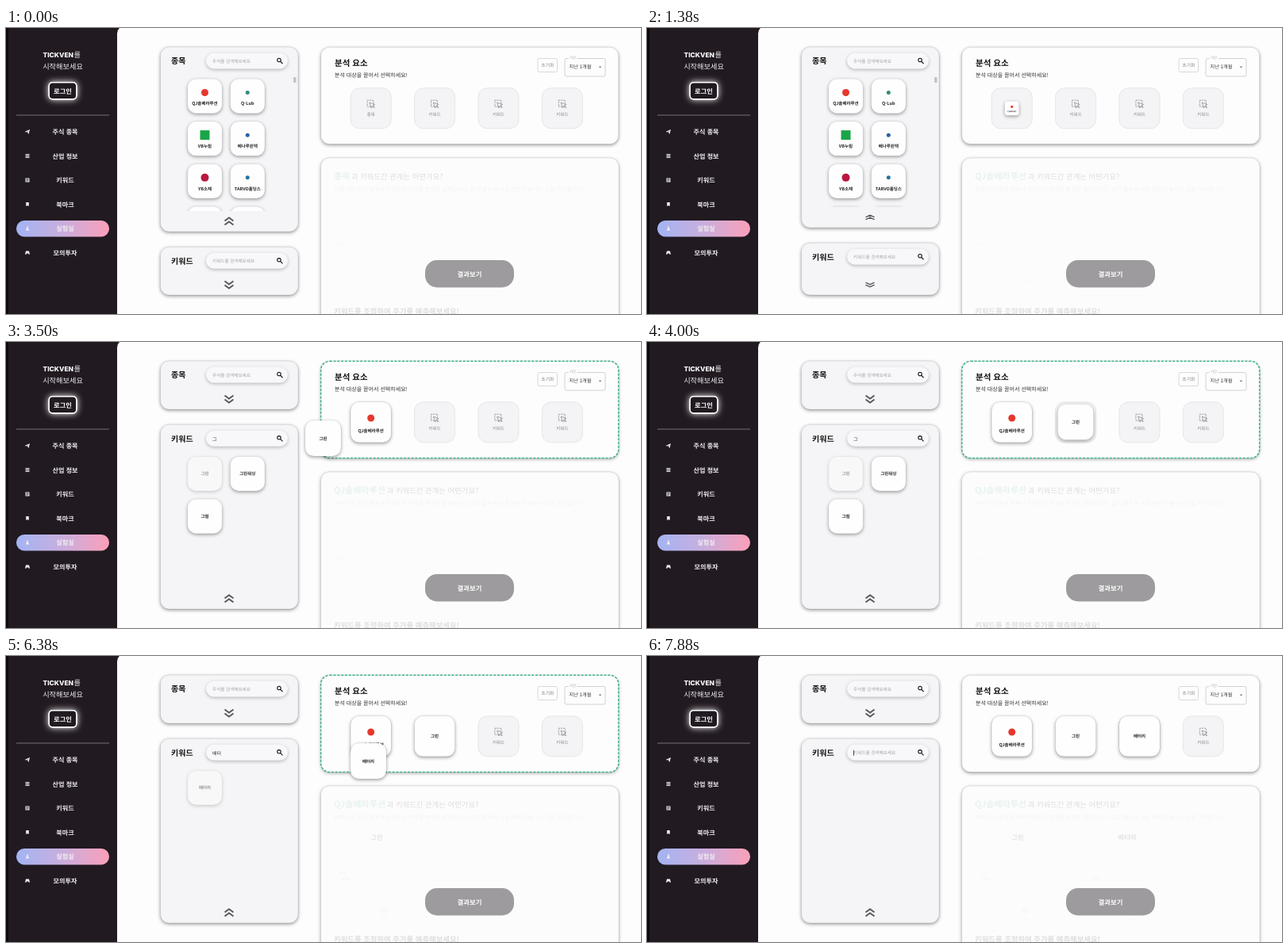
Recreate the animation shown at these times as an HTML page with a canvas. Size 800 px wide and 361 px high, loop 8 s.

```html
<!DOCTYPE html>
<html lang="ko">
<head>
<meta charset="utf-8">
<style>
html, body { margin: 0; width: 100%; height: 100%; overflow: hidden; background: #fefdfe; }
canvas { display: block; width: 800px; height: 361px; }
</style>
</head>
<body>
<canvas id="stage"></canvas>
<script>
const LOOP = 8000, STEP = 125;
const FONT = '"Noto Sans CJK KR", "Noto Sans CJK JP", "Noto Sans CJK", "Noto Sans", sans-serif';
const canvas = document.getElementById('stage');
const dpr = window.devicePixelRatio || 1;
canvas.width = 800 * dpr;
canvas.height = 361 * dpr;
const ctx = canvas.getContext('2d');
ctx.scale(dpr, dpr);
ctx.textBaseline = 'middle';
ctx.textRendering = 'geometricPrecision';

const STOCKS = [
  { label: 'QJ솔베라루션', color: '#e5382c', r: 4.5 },
  { label: 'Q-Lub', color: '#2f8d78', r: 2.5 },
  { label: 'VB누림', color: '#1aa548', r: 6, square: true },
  { label: '베나루윈텍', color: '#2c62a6', r: 2.5 },
  { label: 'YB소재', color: '#b8183f', r: 5 },
  { label: 'TARVO홀딩스', color: '#2273a3', r: 2.5 },
  { label: '' }, { label: '' }
];
const MATCHES = {
  '그': ['그린', '그린워싱', '그림'],
  '배': ['배당', '배수', '배터리', '배틀'],
  '배터': ['배터리']
};
// time, text, focused
const TYPING = [
  [0, '', false], [2000, '', true], [2125, 'ㄱ', true], [2250, '그', true], [2800, '그', false],
  [4375, '그', true], [4500, '', true], [4750, 'ㅂ', true], [4875, '배', true],
  [5250, '뱉', true], [5375, '배터', true], [5700, '배터', false],
  [7375, '배터', true], [7500, '', true]
];
// path points: time, x, y
const DRAGS = [
  { item: STOCKS[0], drop: 1305, path: [[375, 250.5, 86], [800, 400, 96], [1200, 459.5, 101]] },
  { item: { label: '그린' }, drop: 4010, path: [[2875, 250.5, 166], [3500, 399.5, 121.5], [3950, 540, 101]] },
  { item: { label: '배터리' }, drop: 6880, path: [[5750, 250.5, 166], [6375, 456.5, 132.5], [6830, 620.5, 101]] }
];
const FOLD_AT = 1305, FOLD_MS = 360;

const clamp = v => Math.max(0, Math.min(1, v));
const easeCubic = p => p < 0.5 ? 4 * p ** 3 : 1 - 4 * (1 - p) ** 3;

function text(str, x, y, size, color = '#222', weight = 400, align = 'left') {
  ctx.font = `${weight} ${size}px ${FONT}`;
  ctx.fillStyle = color;
  ctx.textAlign = align;
  ctx.fillText(str, x, y);
}

function box(x, y, w, h, r, fill, { stroke, shadow = 0, width = 1, dash = [] } = {}) {
  ctx.save();
  ctx.beginPath();
  ctx.roundRect(x, y, w, h, r);
  if (shadow) {
    ctx.shadowColor = `rgba(0,0,0,${shadow})`;
    ctx.shadowBlur = 4 * dpr;
    ctx.shadowOffsetY = 1.5 * dpr;
  }
  if (fill) { ctx.fillStyle = fill; ctx.fill(); }
  ctx.shadowColor = 'transparent';
  if (stroke) {
    ctx.strokeStyle = stroke;
    ctx.lineWidth = width;
    ctx.setLineDash(dash);
    ctx.stroke();
  }
  ctx.restore();
}

function drawPath(x, y, d, { fill, stroke, width = 1, dash = [], flip = 1 }) {
  const path = new Path2D(d);
  ctx.save();
  ctx.translate(x, y);
  ctx.scale(1, flip);
  if (fill) { ctx.fillStyle = fill; ctx.fill(path, 'evenodd'); }
  if (stroke) {
    ctx.strokeStyle = stroke;
    ctx.lineWidth = width;
    ctx.setLineDash(dash);
    ctx.stroke(path);
  }
  ctx.restore();
}

function card(cx, cy, size, item, { scale = 1, faded = false } = {}) {
  ctx.save();
  ctx.translate(cx, cy);
  ctx.scale(scale, scale);
  box(-size / 2, -size / 2, size, size, 10.5, faded ? '#f9f8f9' : '#fffeff',
    { stroke: 'rgba(0,0,0,.05)', shadow: faded ? 0.16 : 0.38, width: 0.7 });
  if (faded) ctx.globalAlpha = 0.45;
  if (item.color) {
    const r = item.r;
    box(-r, -size * 0.105 - r, 2 * r, 2 * r, item.square ? 0 : r, item.color);
  }
  text(item.label, 0, item.color ? size * 0.215 : 0, 5.5, '#222', 700, 'center');
  ctx.restore();
}

// flip: 1 points up, -1 points down
function chevrons(x, y, flip) {
  drawPath(x, y, 'M-5.5 -.5L0 -4.5L5.5 -.5M-5.5 4.5L0 .5L5.5 4.5', { stroke: '#5a595b', width: 2, flip });
}

function panel(top, bottom, title, placeholder, typed, caret) {
  box(194.5, top, 173.5, bottom - top, 11, '#f5f4f6', { stroke: 'rgba(0,0,0,.11)', shadow: 0.4, width: 0.8 });
  text(title, 208, top + 17.5, 10, '#111', 700);
  box(252, top + 7.5, 103, 20, 10, '#f8f7f9', { shadow: 0.25 });
  if (typed) text(typed, 260, top + 18, 6, '#333');
  else text(placeholder, 260, top + 17.5, 5.6, '#a3a2a4');
  if (caret) {
    ctx.font = `400 6px ${FONT}`;
    ctx.fillStyle = '#222';
    ctx.fillRect(260 + ctx.measureText(typed).width, top + 14.5, 0.8, 7);
  }
  drawPath(344, top + 16.5, 'M2.2 0A2.2 2.2 0 1 1 -2.2 0A2.2 2.2 0 1 1 2.2 0M1.6 1.6L4.5 4.5', { stroke: '#111', width: 1.1 });
}

const MENU = [
  ['주식 종목', 'M-3.5 0L3 -3L1.5 3L0 .8L1 -1L-1 .6Z'],
  ['산업 정보', 'M-2.5 -2.5H2.5V-1.3H-2.5ZM-2.5 -.6H2.5V.6H-2.5ZM-2.5 1.3H2.5V2.5H-2.5Z'],
  ['키워드', 'M-2.5 -2.5H2.5V2.5H-2.5ZM-1.6 -1.5V-.8H1.6V-1.5ZM-1.6 -.2V.5H1.6V-.2ZM-1.6 1V1.6H.5V1Z'],
  ['북마크', 'M-1.8 -2.6H1.8V2.6L0 1.6L-1.8 2.6Z'],
  ['실험실', 'M-.8 -2.5H.8V-.5L2.4 2.4H-2.4L-.8 -.5Z'],
  ['모의투자', 'M-2 -2H2L3 2.2H1.8L.8 1H-.8L-1.8 2.2H-3Z']
];

function sidebar() {
  ctx.fillStyle = '#211a21';
  ctx.fillRect(0, 0, 160, 361);
  ctx.fillStyle = '#0e0a0e';
  ctx.fillRect(0, 0, 3, 361);
  box(140, -3, 700, 380, [10, 0, 0, 0], '#fefdfe');

  ctx.font = '800 8.4px Inter, sans-serif';
  ctx.textAlign = 'right';
  ctx.fillStyle = '#fff';
  ctx.fillText('TICKVEN', 85, 34.5);
  text('를', 85.5, 34, 9.2, '#eee');
  text('시작해보세요', 71.5, 49, 9.2, '#eee', 400, 'center');

  ctx.save();
  ctx.shadowColor = '#fff';
  ctx.shadowBlur = 8 * dpr;
  ctx.fillStyle = '#fff';
  ctx.beginPath();
  ctx.roundRect(53.5, 68, 36, 22.5, 5);
  ctx.fill();
  ctx.restore();
  box(54.2, 68.7, 34.6, 21.1, 4.5, '#211a21', { stroke: '#fff', width: 1.4 });
  text('로그인', 71.5, 79.5, 8.3, '#fff', 700, 'center');
  ctx.fillStyle = '#777276';
  ctx.fillRect(13, 109.5, 117, 1);

  const pill = ctx.createLinearGradient(13, 0, 130, 0);
  pill.addColorStop(0, '#a3b4f3');
  pill.addColorStop(0.5, '#c9aedd');
  pill.addColorStop(1, '#fb9fb9');
  box(13, 243, 117, 20.5, 10, pill);
  MENU.forEach(([label, icon], i) => {
    const y = 131 + 30.5 * i;
    drawPath(27, y, icon, { fill: '#f0edf0' });
    text(label, 74.5, y, 8.1, '#f0edf0', 700, 'center');
  });
}

const isDragged = (label, drag) => Boolean(drag) && drag.item.label === label;

function cardList(items, top, drag) {
  items.forEach((item, i) => {
    card(250.5 + 53.8 * (i % 2), top + 62 + 53.7 * (i >> 1), 43.3, item,
      { faded: isDragged(item.label, drag) });
  });
}

function stockPanel(bottom, flip, drag) {
  panel(24, bottom, '종목', '주식를 검색해보세요', '', false);
  ctx.save();
  ctx.beginPath();
  ctx.rect(196, 60, 171, Math.max(0, bottom - 26 - 60));
  ctx.clip();
  cardList(STOCKS, 24, drag);
  box(362, 62, 3.5, 7, 1, '#c3c2c4');
  ctx.restore();
  chevrons(281, bottom - 13, flip);
}

function keywordPanel(t, top, flip, drag) {
  const [since, typed, focused] = TYPING.findLast(([at]) => at <= t);
  const caret = focused && Math.floor((t - since) / 500) % 2 === 0;
  panel(top, 337, '키워드', '키워드를 검색해보세요', typed, caret);
  cardList((MATCHES[typed] || []).map(label => ({ label })), top, drag);
  chevrons(281, 324, flip);
}

function factorPanel(t, over) {
  box(396.7, 24.3, 375, 122.2, 11, '#fefdfe', over
    ? { stroke: '#45b493', shadow: 0.35, width: 1.6, dash: [3.2, 1.6] }
    : { stroke: 'rgba(0,0,0,.13)', shadow: 0.4, width: 0.8 });
  text('분석 요소', 414, 44.5, 10.5, '#111', 700);
  text('분석 대상을 끌어서 선택하세요!', 414, 59.5, 7, '#333');
  box(670, 38.5, 24.5, 17, 2, null, { stroke: '#cfced0', width: 0.8 });
  text('초기화', 682.3, 47, 5.8, '#888', 400, 'center');
  box(704, 38.5, 51, 22.5, 2, null, { stroke: '#c6c5c7', width: 0.8 });
  ctx.fillStyle = '#fefdfe';
  ctx.fillRect(708.5, 37, 11, 3);
  text('기간', 710, 37.5, 4.3, '#999');
  text('지난 1개월', 709.5, 49, 6.2, '#333');
  drawPath(748.5, 49.5, 'M-1.8 -1H1.8L0 1Z', { fill: '#777' });

  for (let i = 0; i < 4; i++) {
    const cx = 459.7 + 80.4 * i, cy = 101.3;
    const grown = i < 3 ? clamp((t - DRAGS[i].drop) / 200) : 0;
    box(cx - 25.5, cy - 25.5, 51, 51, 11, '#f4f3f5', { stroke: '#e2e1e3', width: 0.8 });
    if (grown) {
      card(cx, cy, 51, DRAGS[i].item, { scale: grown });
      continue;
    }
    drawPath(cx, 96, 'M-4.6 -4.8H3.4V3.2H-4.6Z', { stroke: '#8d8c8e', width: 0.8, dash: [2, 0.8] });
    drawPath(cx, 96, 'M-1.8 -2L5 .6L2.4 1.8L4.8 4.2L4 5L1.6 2.6L.5 5Z', { fill: '#f4f3f5', stroke: '#8d8c8e', width: 0.8 });
    text(i ? '키워드' : '종목', cx, 109.3, 5.5, '#858486', 400, 'center');
  }
}

function resultPanel(t) {
  box(396.5, 164, 375.5, 230, 11, '#fdfcfd', { stroke: 'rgba(0,0,0,.12)', shadow: 0.35, width: 0.8 });
  const name = t >= DRAGS[0].drop ? DRAGS[0].item.label : '종목';
  text(name, 413, 187, 11.1, '#e7f3f0', 700);
  const nameWidth = ctx.measureText(name).width;
  text('과 키워드간 관계는 어떤가요?', 414.5 + nameWidth, 187.5, 9.4, '#dedcde');
  text('선택 기간 동안 종목과 키워드의 관계를 분석한 결과입니다. 값이 클수록 서로 관련이 높다는 것을 의미합니다.', 413, 203.5, 7, '#f5f0f2');

  text('높음', 424, 272, 4.5, '#f5f4f5', 400, 'center');
  text('관련', 476, 320, 4.5, '#f5f4f5', 400, 'center');
  DRAGS.slice(1).forEach(({ item, drop }, i) => {
    if (t < drop) return;
    const x = 467 + 138 * i;
    text(item.label, x, 228.5, 8.4, '#e3e2e4', 700, 'center');
    text('주가', x - 40, 282, 5.5, '#f2f1f2', 400, 'center');
    text('관련', x + 9, 323, 4.5, '#f3f2f3', 400, 'center');
    text('지수', x + 9, 333, 4.5, '#f3f2f3', 400, 'center');
  });
  text('키워드를 조정하여 주가를 예측해보세요!', 413, 357, 9.4, '#dfdddf', 700);
  box(528, 293, 112, 34.5, 15, '#9d9b9d');
  text('결과보기', 584, 310.5, 8.4, '#fff', 700, 'center');
}

function dragPosition(path, t) {
  const next = path.findIndex(([at]) => at > t);
  if (next < 0) return path[path.length - 1].slice(1);
  const [t0, x0, y0] = path[next - 1], [t1, x1, y1] = path[next];
  const p = (t - t0) / (t1 - t0);
  return [x0 + (x1 - x0) * p, y0 + (y1 - y0) * p];
}

function draw(t) {
  const drag = DRAGS.find(d => t >= d.path[0][0] && t < d.drop);
  const pos = drag && dragPosition(drag.path, t);
  const fold = clamp((t - FOLD_AT) / FOLD_MS);
  const bottom = 257 - 172 * easeCubic(fold);
  const flip = 1 - 2 * fold;

  sidebar();
  stockPanel(bottom, flip, drag);
  keywordPanel(t, bottom + 19.3, -flip, drag);
  factorPanel(t, pos && pos[0] > 396);
  resultPanel(t);
  if (drag) card(pos[0], pos[1], 45, drag.item);
}

function tick(now) {
  draw(Math.floor((now % LOOP) / STEP) * STEP);
  requestAnimationFrame(tick);
}
requestAnimationFrame(tick);
</script>
</body>
</html>
```
